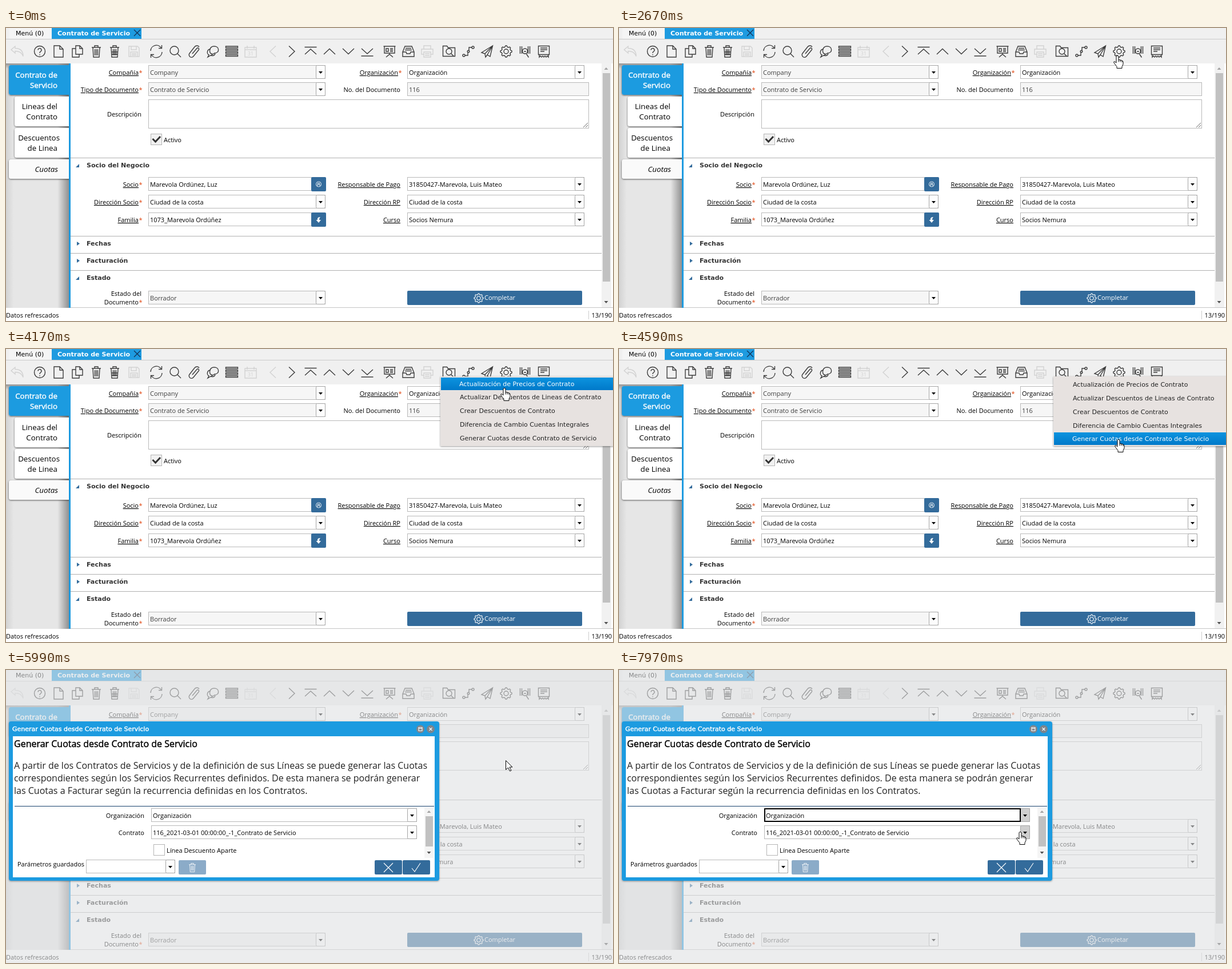
These frames come from a looping animation (1062x513 px, 8 s). An HTML page:

```html
<!DOCTYPE html>
<html lang="es">
<head>
<meta charset="utf-8">
<title>Contrato de Servicio</title>
<style>
html, body { margin: 0; width: 100%; height: 100%; overflow: hidden; background: #fff; }
svg { display: block; }
text { font: 11px "Open Sans", sans-serif; white-space: pre; }
.v { font-family: "DejaVu Sans", sans-serif; }
.b { font-weight: bold; }
.s { font-size: 13.33px; }
.p { font-size: 16px; }
.u { text-decoration: underline; }
.e { text-anchor: end; }
.w { fill: #fff; }
.i { fill: none; stroke: #3c3c3c; stroke-width: 1.4; }
.off { stroke: #d2d2d2; }
.wi { fill: none; stroke: #fff; stroke-width: 1.1; }
.fat { stroke: #000; stroke-width: .45; }
.fatw { fill: #fff; stroke: #fff; stroke-width: .45; }

#cursor, #cursor g, #menu, #panel, #dialog, #focus, #caret, #over, .row, .row + g, .item {
  animation: 8s step-end infinite;
}
#cursor { animation-name: move; }
#cursor .arrow { animation-name: arrow; }
#cursor .hand { animation-name: hand; }
#cursor .beam { animation-name: beam; }
#menu { animation-name: menu; }
#panel { animation-name: panel; }
#dialog { animation-name: dialog; }
#focus { animation-name: focus; }
#caret { animation-name: caret; }
#over { animation-name: over; }

@keyframes move {
  0%, 6.749% { transform: translate(1113px, 557px); }
  6.75% { transform: translate(1113px, 557px); animation-timing-function: steps(6, start); }
  12% { transform: translate(728px, 213px); }
  24.125% { transform: translate(728px, 213px); animation-timing-function: steps(12, start); }
  34.2125% { transform: translate(872px, 48px); }
  52.125% { transform: translate(872px, 68px); animation-timing-function: steps(6, end); }
  57.375% { transform: translate(874px, 158px); }
  80.875% { transform: translate(874px, 158px); animation-timing-function: steps(7, start); }
  86.85% { transform: translate(735px, 243px); }
  91.875% { transform: translate(731px, 248px); animation-timing-function: steps(8, end); }
  99.625%, 100% { transform: translate(702px, 283px); }
}
@keyframes arrow { 0% { opacity: 1 } 33.375% { opacity: 0 } 74.875% { opacity: 1 } 96.75%, 100% { opacity: 0 } }
@keyframes hand { 0% { opacity: 0 } 33.375% { opacity: 1 } 72.5% { opacity: 0 } 96.75%, 100% { opacity: 1 } }
@keyframes beam { 0% { opacity: 0 } 72.5% { opacity: 1 } 74.875%, 100% { opacity: 0 } }
@keyframes menu { 0% { opacity: 0 } 43.75% { opacity: 1 } 70.75%, 100% { opacity: 0 } }
@keyframes panel { 0% { height: 124px } 52.125%, 100% { height: 122px } }
@keyframes dialog { 0% { opacity: 0 } 74.875%, 100% { opacity: 1 } }
@keyframes focus { 0% { opacity: 0 } 75.875%, 100% { opacity: 1 } }
@keyframes caret { 0% { opacity: 0 } 75.875% { opacity: 1 } 82.625% { opacity: 0 } 89.375% { opacity: 1 } 96.125%, 100% { opacity: 0 } }
@keyframes over { 0% { opacity: 0 } 96.75%, 100% { opacity: 1 } }
</style>
</head>
<body>
<svg id="stage" width="1062" height="513" viewBox="0 0 1062 513"></svg>
<script>
const BLUE = '#1e9be0', STEEL = '#336b9b';

const rect = (x, y, w, h, fill, more = '') =>
  `<rect x="${x}" y="${y}" width="${w}" height="${h}" fill="${fill}" ${more}/>`;
const text = (x, y, s, cls = '') => `<text x="${x}" y="${y}" class="${cls}">${s}</text>`;
const path = (d, cls = 'i', more = '') => `<path d="${d}" class="${cls}" ${more}/>`;
const place = (x, y, body) => `<g transform="translate(${x} ${y})">${body}</g>`;
const star = (x, y) => text(x + .5, y, '*').replace('<text', '<text fill="#e0440e"');
const label = (x, y, s, req, link = true) =>
  text(x, y, s, link ? 'e u' : 'e') + (req ? star(x, y) : '');

const comboButton = (x, y, h, fill = '#fdfdfd') =>
  rect(x + .5, y + .5, 16, h - 1, fill, 'rx="2" stroke="#a5a5a5"') +
  path(`M${x + 5} ${y + h / 2 - 1}h7l-3.5 4z`, '', 'fill="#000"');

function field(x, y, w, s = '', { ro = false, combo = true, h = 24 } = {}) {
  const ink = ro ? '#3d3d3d' : '#000';
  return rect(x + .5, y + .5, w - 1, h - 1, ro ? '#f6f6f6' : '#fff', 'stroke="#b9b9b9"') +
    `<text x="${x + 3}" y="${y + 17}" fill="${ink}">${s}</text>` +
    (combo ? comboButton(x + w - 17, y, h) : '');
}

function gear(r) {
  const pts = [];
  for (let k = 0; k < 32; k++) {
    const a = (k - .5) * Math.PI / 16, q = k % 4 < 2 ? r : r * .79;
    pts.push((q * Math.cos(a)).toFixed(1) + ' ' + (q * Math.sin(a)).toFixed(1));
  }
  const c = r * .4;
  return `M${pts.join('L')}zM${c} 0a${c} ${c} 0 1 0 ${-2 * c} 0a${c} ${c} 0 1 0 ${2 * c} 0`;
}

const ring = (x, y, r) => `M${x + r} ${y}a${r} ${r} 0 1 0 ${-2 * r} 0a${r} ${r} 0 1 0 ${2 * r} 0`;
const trash = 'M-8-7h16M-3-7v-3h6v3M-6-7l1 17h10l1-17M-2.5-4v11M0-4v11M2.5-4v11';

function toolbar() {
  const icons = [
    [19, 'M-3-9l-7 6 7 6v-3.5c7 0 11 2 14 9 0-9-5-14-14-14z', 1],
    [59, ring(0, 0, 9.5) + 'M-3-2.5a3 3 0 1 1 4.2 2.8q-1.2.7-1.2 2.7M0 5v1.6'],
    [92, 'M-8-10h10l6 6v14h-16zM2-10v6h6'],
    [125, 'M-3-10h7l5 5v10h-12zM4-10v5h5M-3-5h-6v15h12v-5'],
    [158, trash],
    [190, trash + 'M-5 1h10M-5 5h10'],
    [224, 'M-9-9h15l3 3v15h-18zM-5-9v6h9v-6M-6 9v-8h12v8M-4 4h8M-4 6.5h8', 1],
    [263, 'M-10-1a10 10 0 0 1 18.5-5M10 1a10 10 0 0 1-18.5 5M9.500-11v5.500h-5.500M-9.500 11v-5.500h5.500'],
    [296, ring(-1.5, -1.5, 7.5) + 'M4 4l6 6'],
    [329, 'M-3 4l8-9.500a2 2 0 0 1 3 3l-9 11a4 4 0 0 1-7-5l9-11.500a5 5 0 0 1 8 0'],
    [362, 'M-3 4c-4-1-4-13 5-13 10 0 10 12 1 12l-5 3v-3M-4-4c-7 0-7 9-3 10l-2 4 5-3c4 1 7 0 8-3'],
    [395, [-9, -4, 1, 6].map(y => `M-10.500 ${y}h21v2.500h-21z`).join('')],
    [428, 'M-10-7h20v17h-20zM-10-3h20M-6-10v5M6-10v5', 1],
    [467, 'M5-9.500l-10 9.500 10 9.500', 1],
    [500, 'M-5-9.500l10 9.500-10 9.500'],
    [533, 'M-10.500-7.500h21M-10 5l10-9 10 9'],
    [566, 'M-10 5l10-9.500 10 9.500'],
    [599, 'M-10-5l10 9.500 10-9.500'],
    [632, 'M-10-5l10 9 10-9M-10.500 8h21'],
    [671, 'M-10.500-9h21M-9-9v12h18v-12M0 3v3M-6 10l6-5 6 5M-6-5h4v5h-4zM1-5h5M1-2.500h5M1 0h5'],
    [704, 'M-10 1l4-10h12l4 10v8h-20zM-10 1h6l1 3h6l1-3h6M-5-5.500h10M-6-2.500h12'],
    [737, 'M-6-4v-6h12v6M-6 5h-4v-9h20v9h-4M-6 1h12v9h-12zM-4 4h8M-4 7h8', 1],
    [775, 'M-10.500 8.500v-18h7l2 3h12v15zM4 4l4 4' + ring(0, 0, 5)],
    [809, ring(-8, 7, 2) + ring(8, -7, 2) + ring(0, 0, 1.8) + 'M-6 7h5V2M1-2v-5h5'],
    [842, 'M9.500-10l-19.500 12 6 2 1 6 3-4 5 3zM9.500-10l-13.500 14M9.500-10l-9.500 16'],
    [875, gear(10)],
    [908, 'M-8.500-9v13M-5.500-9v13M5.500-9v13M8.500-9v13M2.500 4.500l4 6M-2 0h4' + ring(0, -.5, 4.5)],
    [941, 'M-9.500-9.500h19v15h-19zM-6-6h12M-6-3h12M-6 0h7M-8 6v4l2-2 2 2 2-2 2 2 2-2 2 2 2-2 2 2v-4'],
  ];
  return icons.map(([x, d, off]) => place(x, 41, path(d, off ? 'i off' : 'i'))).join('') +
    '<text x="428" y="48" text-anchor="middle" fill="#d2d2d2" style="font-size:9px">31</text>';
}

const bullet = (y, open) => path(open ? `M122 ${y + 4}h6v-6z` : `M124 ${y - 3}v7l5-3.500z`, '', `fill="${STEEL}"`);
const section = (y, s, open) => path(`M113 ${y + .5}h929`, '', 'stroke="#b0b0b0"') +
  bullet(y + 13, open) + `<text x="141" y="${y + 17}" class="v b" fill="#333">${s}</text>`;
const sideTab = (x, y, h, fill) =>
  `<path d="M112 ${y}H${x + 4}q-4 0-4 4v${h - 8}q0 4 4 4H112z" fill="${fill}" filter="url(#glow)"/>`;

function app() {
  return rect(0, 0, 1062, 62, '#f0f0f0') + rect(0, 19, 1062, 1, '#c9c9c9') +
    rect(6, 0, 74, 19, '#f5f5f5') + text(17, 13, 'Menú (0)', 'v') +
    rect(80, 0, 157, 19, BLUE) + text(90, 13, 'Contrato de Servicio', 'v b w') +
    path('M224 3l11 11M235 3l-11 11', '', 'stroke="#14365a" stroke-width="1.4"') +
    toolbar() +
    rect(0, 62, 110, 428, 'url(#side)') + rect(0, 62, 110, 9, 'url(#top)') +
    `<svg width="110" height="490">` +
    sideTab(15, 120, 52, '#fff') + sideTab(15, 175, 52, '#fff') +
    sideTab(5, 230, 34, '#fafafa') + sideTab(5, 65, 52, BLUE) + '</svg>' +
    text(90, 87, 'Contrato de', 's e fatw') + text(90, 105, 'Servicio', 's e fatw') +
    text(90, 142, 'Lineas del', 's e') + text(90, 160, 'Contrato', 's e') +
    text(94, 197, 'Descuentos', 's e') + text(90, 215, 'de Linea', 's e') +
    '<text x="91" y="252" class="s e" font-style="italic" style="font-style:italic">Cuotas</text>' +
    rect(110, 62, 3, 428, BLUE) +

    label(232, 82, 'Compañía', 1) + field(249, 65, 310, 'Company', { ro: true }) +
    label(686, 82, 'Organización', 1) + field(702, 65, 310, 'Organización') +
    label(232, 112, 'Tipo de Documento', 1) + field(249, 95, 310, 'Contrato de Servicio', { ro: true }) +
    label(690, 112, 'No. del Documento', 0, false) + field(702, 95, 318, '116', { ro: true, combo: false }) +
    label(237, 155, 'Descripción', 0, false) + field(249, 125, 771, '', { combo: false, h: 51 }) +
    path('M1010 174l8-8M1014 174l4-4', '', 'stroke="#666"') +
    rect(253.5, 185.5, 19, 19, '#f1f1f1', 'stroke="#b5b5b5"') +
    path('M256.500 194l5 5 8.500-9', '', 'fill="none" stroke="#333" stroke-width="3"') +
    text(276, 200, 'Activo') +

    section(227, 'Socio del Negocio', true) +
    label(232, 278, 'Socio', 1) + field(249, 261, 286, 'Marevola Ordúnez, Luz', { combo: false }) +
    rect(534, 261, 26, 25, STEEL, 'rx="2"') +
    place(547, 273.5, path(ring(0, 0, 4.5) + 'M-2 3.500v-3h4v3M-1.500-2h3v2h-3z', 'wi', 'opacity=".75"')) +
    label(690, 278, 'Responsable de Pago') + field(702, 261, 310, '31850427-Marevola, Luis Mateo') +
    label(232, 309, 'Dirección Socio', 1) + field(249, 292, 310, 'Ciudad de la costa') +
    label(690, 309, 'Dirección RP') + field(702, 292, 310, 'Ciudad de la costa') +
    label(232, 340, 'Familia', 1) + field(249, 323, 286, '1073_Marevola Ordúñez', { combo: false }) +
    rect(534, 323, 26, 25, STEEL, 'rx="2"') +
    path('M550 331q-6 0-5 5h-2.500l4.500 5 4-5h-3q-.5-3 2-5z', 'w') +
    label(690, 340, 'Curso') + field(702, 323, 310, 'Socios Nemura') +

    section(364, 'Fechas') + section(394, 'Facturación') + section(424, 'Estado', true) +
    text(237, 469, 'Estado del', 'e') + label(232, 484, 'Documento', 1, false) +
    field(249, 460, 310, 'Borrador', { ro: true }) +
    rect(702, 460, 306, 25, STEEL, 'rx="2"') + place(827, 473, path(gear(8), 'wi')) +
    text(837, 476, 'Completar', 'w') +

    rect(1042, 62, 17, 427, '#f1f1f1') + rect(1044, 79, 13, 365, '#c1c1c1') +
    path('M1046.500 73h7l-3.500-4z', '', 'fill="#a3a3a3"') +
    path('M1046.500 478h7l-3.500 4z', '', 'fill="#505050"') +
    rect(113, 489, 949, 1, '#c4c4c4') + rect(0, 490, 1062, 23, '#fff') +
    text(0, 507, 'Datos refrescados') + rect(1019, 495, 1, 15, '#ccc') + text(1060, 507, '13/190', 'e');
}

const items = [
  'Actualización de Precios de Contrato',
  'Actualizar Descuentos de Lineas de Contrato',
  'Crear Descuentos de Contrato',
  'Diferencia de Cambio Cuentas Integrales',
  'Generar Cuotas desde Contrato de Servicio',
];
const enter = [4170, 4240, 4310, 4450, 4520, 5660];

// The hovered row is 2px shorter, so the rows below it move up.
function menu() {
  let css = '', rows = '', bars = '';
  items.forEach((s, k) => {
    const y = 50 + 24 * k, on = enter[k] / 80, out = enter[k + 1] / 80;
    css += `@keyframes lift${k}{0%{transform:none}52.125%{transform:translateY(-2px)}${out}%,100%{transform:none}}` +
      `@keyframes hover${k}{0%{opacity:0}${on}%{opacity:1}${out}%,100%{opacity:0}}`;
    rows += `<g class="item" style="animation-name:lift${k}">${text(794, y + 16, s, 'v')}</g>`;
    bars += `<g class="item" style="animation-name:hover${k}">` +
      rect(761, y, 301, 22, 'url(#bar)') + text(793, y + 15, s, 'v w') + '</g>';
  });
  return `<style>${css}</style><g id="menu">` +
    `<rect id="panel" x="760" y="48" width="304" height="122" fill="#e7e2e0" filter="url(#shade)"/>` +
    `<g fill="#222">${rows}</g>${bars}</g>`;
}

function dialog() {
  return '<g id="dialog">' + rect(0, 0, 1062, 513, '#e0e1e3', 'opacity=".6"') +
    rect(5, 90, 753, 279, BLUE, 'rx="4" filter="url(#shade)"') + rect(12, 116, 738, 247, '#fff') +
    text(11, 107, 'Generar Cuotas desde Contrato de Servicio', 'v fatw') +
    [725, 743].map(x => `<circle cx="${x}" cy="103.500" r="7" fill="#7d858c"/>`).join('') +
    path('M722 100.500h6v6h-6zM722 102.500h6M740.500 101l5 5M745.500 101l-5 5', 'wi') +
    text(14, 135, 'Generar Cuotas desde Contrato de Servicio', 'p fat') +
    '<g fill="#222">' +
    text(14, 173, 'A partir de los Contratos de Servicios y de la definición de sus Líneas se puede generar las Cuotas', 'p') +
    text(14, 195, 'correspondientes según los Servicios Recurrentes definidos. De esta manera se podrán generar', 'p') +
    text(14, 217, 'las Cuotas a Facturar según la recurrencia definidas en los Contratos.', 'p') + '</g>' +
    rect(15, 238, 734, 1, '#17406b') +
    label(242, 259, 'Organización', 0, false) + field(254, 242, 465, 'Organización') +
    '<g id="focus">' + comboButton(702, 242, 24, '#cfcfcf') +
    rect(255, 243, 447, 22, 'none', 'stroke="#000" stroke-width="2"') + '</g>' +
    `<g id="caret">${rect(257, 247, 1, 15, '#000')}</g>` +
    label(242, 289, 'Contrato', 0, false) +
    field(254, 272, 465, '116_2021-03-01 00:00:00_-1_Contrato de Servicio') +
    `<g id="over">${comboButton(702, 272, 24, '#cfcfcf')}</g>` +
    rect(258.5, 305.5, 19, 19, '#fff', 'stroke="#b5b5b5"') + text(281, 320, 'Línea Descuento Aparte') +
    rect(732, 241, 16, 88, '#f5f5f5') + rect(734, 256, 13, 53, '#c1c1c1') +
    path('M736.500 250h7l-3.500-4z', '', 'fill="#a3a3a3"') +
    path('M736.500 318h7l-3.500 4z', '', 'fill="#505050"') +
    text(20, 344, 'Parámetros guardados') + field(140, 332, 156) +
    rect(302, 333, 48, 25, '#8babc8', 'rx="2"') +
    place(326, 346, path(trash, 'wi', 'transform="scale(.75)"')) +
    rect(645, 333, 48, 25, STEEL, 'rx="2"') + rect(694, 333, 48, 25, STEEL, 'rx="2"') +
    path('M661 338l16 16M677 338l-16 16M710 347l5 6 10-15', 'wi') + '</g>';
}

const cursor = `<g id="cursor" fill="#fff" stroke="#000">
  <g class="arrow">${path('M.5.5v16l4-3.500 3 6 2.500-1-3-6h5z', '')}</g>
  <g class="hand">${path('M-2 1.500q2-2.500 4 0v6l3 .5 3 1 2 1.500v5l-2 4v3h-9v-3l-4-5-1.500-3 1.500-1 3 2.500zM2 7.500v4M5 8v3.500M8 9v3', '')}</g>
  <g class="beam">${path('M-2-6h2.500M1.500-6h2.500M1-6v14M-2 8h2.500M1.500 8h2.500', '')}</g></g>`;

const stop = (o, c, a = 1) => `<stop offset="${o}" stop-color="${c}" stop-opacity="${a}"/>`;
const defs = `<defs>
  <linearGradient id="side">${stop(0, '#d2d2d2') + stop(.12, '#e6e6e6') + stop(.82, '#e6e6e6') + stop(1, '#909090')}</linearGradient>
  <linearGradient id="top" x2="0" y2="1">${stop(0, '#777', .7) + stop(1, '#777', 0)}</linearGradient>
  <linearGradient id="bar" x2="0" y2="1">${stop(0, '#0c93df') + stop(1, '#0079c9')}</linearGradient>
  <filter id="glow"><feDropShadow dx="0" dy="1" stdDeviation="1.500" flood-opacity=".6"/></filter>
  <filter id="shade"><feDropShadow dx="0" dy="1" stdDeviation="1.500" flood-opacity=".4"/></filter></defs>`;

document.getElementById('stage').innerHTML = defs + app() + menu() + dialog() + cursor;
</script>
</body>
</html>
```
